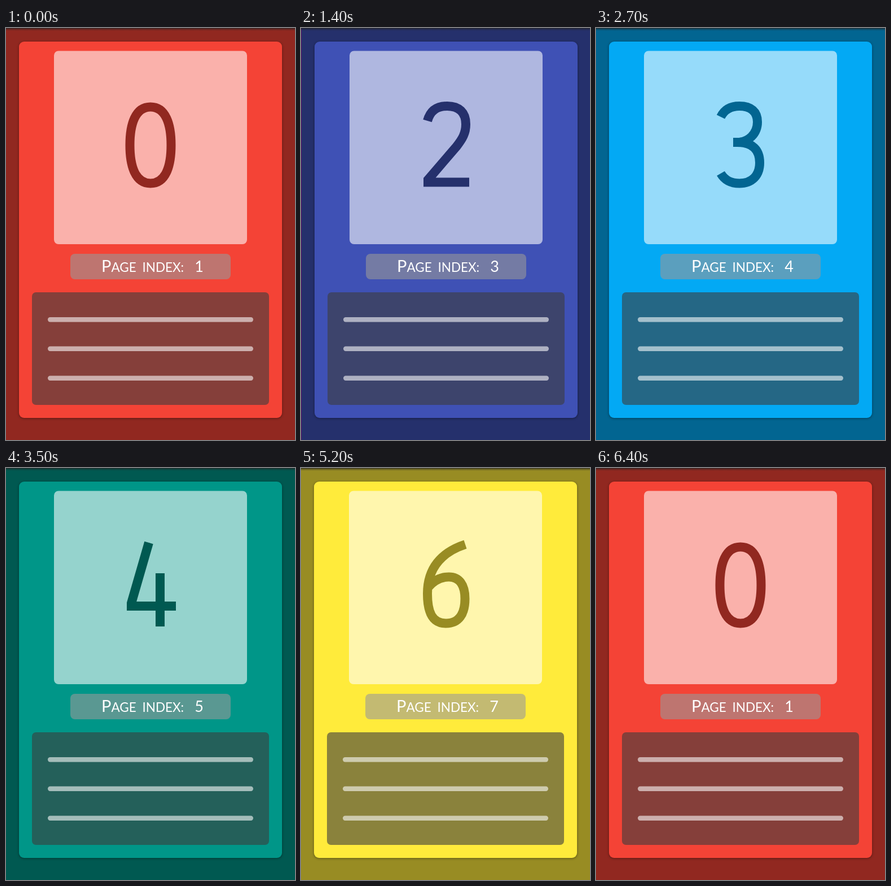
Recreate the animation shown at these times as an HTML page. Size 512 px wide and 728 px high, loop 6.5 s.

```html
<!DOCTYPE html>
<html lang="en">
<head>
<meta charset="utf-8">
<title>Swiping pages</title>
<style>
  html, body { margin: 0; width: 100%; height: 100%; overflow: hidden; background: #222; }
  svg { display: block; width: 100%; height: 100%; }
  .card { filter: drop-shadow(0 1px 2px rgba(0, 0, 0, .4)); }
  .numeral { fill: none; stroke-width: 16; }
  .label { fill: #fff; font: 22.5px Lato, sans-serif; word-spacing: 5px; }
  .label .large { font-size: 29px; }
  .index { fill: #fff; font: 27px Lato, sans-serif; text-anchor: middle; }
</style>
</head>
<body>
<svg viewBox="0 0 512 728">
  <defs>
    <linearGradient id="shade" x2="0" y2="1">
      <stop stop-color="#222" stop-opacity=".85"/>
      <stop offset=".4" stop-color="#222" stop-opacity=".4"/>
      <stop offset="1" stop-color="#222" stop-opacity="0"/>
    </linearGradient>
  </defs>
  <g id="pager"></g>
  <rect width="512" height="5" fill="url(#shade)"/>
</svg>
<script>
const LOOP = 6500, WIDTH = 512, SWIPE = 550;
const swipeStarts = [100, 900, 1900, 2880, 3540, 4350, 5200];

const pages = [
  { rgb: [244, 67, 54], numeral: 'M256 139.5C283 139.5 292.5 170 292.5 207S283 274.5 256 274.5 219.5 244 219.5 207 229 139.5 256 139.5Z' },
  { rgb: [156, 39, 176], numeral: 'M220 160L258 139V273M218 273H296' },
  { rgb: [63, 81, 181], numeral: 'M223 164C228 146 240 138 258 138C279 138 291 149 291 170C291 186 285 196 274 210L224 268V272.5H297' },
  { rgb: [3, 169, 244], numeral: 'M221 157C227 145 238 138 254 138C275 138 286 148 286 166C286 187 270 202 250 202H243M250 202C277 202 290 215 290 238C290 261 276 274.5 254 274.5C239 274.5 228 269 221 257' },
  { rgb: [0, 150, 136], numeral: 'M253 132L222 239V244H301M273 186V280' },
  { rgb: [139, 195, 74], numeral: 'M290 139H230.5L228 207M230 202C237 195 247 191.5 258 191.5C279 191.5 290 207 290 231C290 259 277 274.5 253 274.5C239 274.5 228 269 222 257' },
  { rgb: [255, 235, 59], numeral: 'M291 135C248 149 224 178 224 222C224 256 233 274.5 257 274.5C279 274.5 290.5 259 290.5 231C290.5 206 280 192.5 262 192.5C248 192.5 236 198 225 211' },
];

const box = (x, y, w, h, r, fill, extra = '') =>
  `<rect x="${x}" y="${y}" width="${w}" height="${h}" rx="${r}" fill="${fill}" ${extra}/>`;

function pageMarkup({ rgb, numeral }, i) {
  const base = `rgb(${rgb})`;
  const dark = `rgb(${rgb.map(c => Math.round(c * .595))})`;
  const veil = 'rgba(255,255,255,.583)';
  return `<g>
    ${box(0, 0, WIDTH, 728, 0, dark)}
    ${box(23, 24, 466, 665, 9, base, 'class="card"')}
    ${box(85, 40.5, 342, 341.5, 8, veil)}
    <path class="numeral" d="${numeral}" stroke="${dark}"/>
    ${box(114, 399, 284, 45, 8, 'rgba(154,154,154,.59)')}
    <text class="label" x="169" y="431"><tspan class="large">P</tspan>AGE INDEX:</text>
    <text class="index" x="342" y="431">${i + 1}</text>
    ${box(46, 467, 420, 199, 7, 'rgba(60,60,60,.6)')}
    ${[511, 562.5, 614.5].map(y => box(74, y, 364, 8.5, 4.2, veil)).join('')}
  </g>`;
}

const pager = document.getElementById('pager');
pager.innerHTML = pages.map(pageMarkup).join('');

// Short pickup, long settling tail.
const ease = t => 1 - (1 - t ** 1.5) ** 3;
const clamp = t => Math.min(1, Math.max(0, t));

function draw(now) {
  const time = now % LOOP;
  const position = swipeStarts.reduce((sum, start) => sum + ease(clamp((time - start) / SWIPE)), 0);
  const count = pages.length;
  [...pager.children].forEach((page, i) => {
    const slot = (i - position + 1 + count) % count - 1;
    page.setAttribute('transform', `translate(${Math.round(slot * WIDTH)})`);
  });
}

const began = performance.now();
function tick() {
  draw(performance.now() - began);
  requestAnimationFrame(tick);
}
tick();
</script>
</body>
</html>
```
